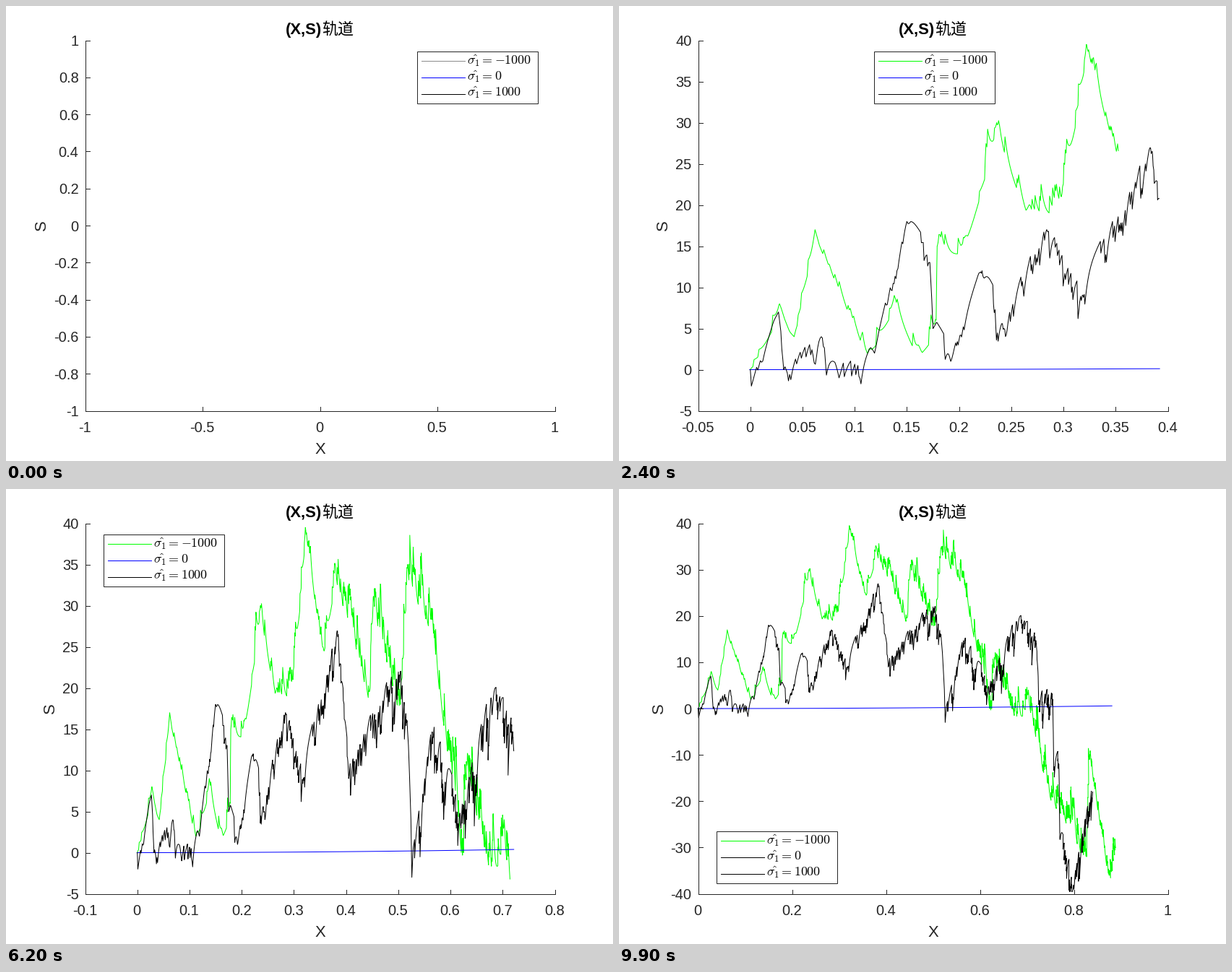
Animation, 840 px wide and 630 px high, one loop 10000 ms. Source, as a matplotlib script:

```python
import numpy as np
import matplotlib.pyplot as plt
from matplotlib.animation import FuncAnimation
from matplotlib.patches import Rectangle

plt.rcParams["mathtext.fontset"] = "cm"
W, H, DPI = 840, 630, 100
PX = 72 / DPI
LEFT, RIGHT, TOP, BOTTOM = 109.5, 759.5, 47.5, 560.5
INK = "#262626"
GREEN, BLUE, BLACK = "#00ff00", "#0000ff", "#000000"
FRAMES = 100

# Main turning points: X in thousandths, S
GREEN_KEYS = [
    (0, 0), (28, 8), (42, 4), (62, 17), (112, 2), (138, 9), (161, 3),
    (178, 6), (179, 15), (205, 16), (236, 30), (267, 20), (298, 21),
    (322, 39.5), (355, 25), (379, 35), (446, 20), (452, 31), (504, 18),
    (518, 35), (564, 29), (625, 0), (632, 11), (680, -1), (703, 4),
    (744, -16), (797, -24), (827, -32), (834, -10), (875, -36), (889, -30)]
BLACK_KEYS = [
    (0, 0), (1, -2), (27, 7), (32, 0), (68, 4), (85, -1), (119, 2),
    (150, 18), (172, 13), (175, 5), (192, 1), (222, 12), (243, 5),
    (284, 17), (318, 9), (385, 26.5), (405, 9), (504, 22), (517, 16),
    (526, -3), (567, 14), (620, 3), (679, 18), (720, 14), (725, 1),
    (755, 2), (757, -13), (768, -12), (770, -28), (800, -39), (840, -18)]


def smooth(t, a, b):
    u = np.clip((t - a) / (b - a), 0, 1)
    return u * u * (3 - 2 * u)


def lead(n):
    """X reached by the blue path at frame n."""
    u = n / FRAMES
    return u * (2.03 - 1.81 * u + .665 * u * u)


def jump_path(keys, sign, seed, pace):
    """Path through the keys with sudden jumps that drift back."""
    rng = np.random.default_rng(seed)
    kx, ks = np.array(keys).T / [[1000], [1]]
    steps = 1 + np.abs(np.diff(kx)) * 1000 * (.8 + 2 * kx[:-1])
    at = np.concatenate([[0], np.cumsum(steps)])
    u = np.union1d(np.arange(at[-1]), at)
    x, s = np.interp(u, at, kx), np.interp(u, at, ks)

    chance, decay = .22, .8
    kicks = np.where(rng.random(len(u)) < chance, rng.uniform(.8, 2.2, len(u)), 0)
    level = mean = chance * 1.5 / (1 - decay)
    saw = np.empty(len(u))
    for i, kick in enumerate(kicks):
        level = level * decay + kick
        saw[i] = level - mean
    taper = np.clip(np.abs(u[:, None] - at).min(axis=1) / 4, 0, 1)
    calm = np.where(sign * np.gradient(s, u) < -.25, .5, 1)
    saw *= sign * taper * calm * (.8 + 1.5 * x)

    s = np.clip(s + saw, -39.5, 39.8)
    x = x - sign * .0003 * x * saw
    n = np.arange(FRAMES)
    when = np.interp(np.maximum.accumulate(x), lead(n) * pace(n), n)
    return x, s, when


green = jump_path(GREEN_KEYS, 1, 4, lambda n: .9 + .11 * smooth(n, 35, 72))
black = jump_path(BLACK_KEYS, -1, 9, lambda n: 1 - .05 * smooth(n, 62, 87))


def shown(path, n):
    count = np.searchsorted(path[2], n + 1e-9, side="right")
    return path[0][:count], path[1][:count]


def auto_ticks(lo, hi):
    """Smallest 1-2-5 step that covers the range in at most nine intervals."""
    for e in range(-4, 3):
        for m in (1, 2, 5):
            step = m * 10.0 ** e
            a = int(np.floor(lo / step + .005))
            b = int(np.ceil(hi / step - .005))
            if 0 < b - a <= 9:
                return [round(i * step, 6) for i in range(a, b + 1)]


def scale(v, ticks, start, end):
    return start + (np.asarray(v) - ticks[0]) / (ticks[-1] - ticks[0]) * (end - start)


fig = plt.figure(figsize=(W / DPI, H / DPI), dpi=DPI, facecolor="white")
ax = fig.add_axes([0, 0, 1, 1])


def line(x, y, color, **kw):
    ax.plot(x, y, color=color, lw=PX, **kw)


def text(x, y, s, size=20, ha="center", color=INK, font="Liberation Sans", **kw):
    ax.text(x, y, s, fontsize=size * PX, ha=ha, va="baseline", color=color,
            fontfamily=font, **kw)


def label_width(s):
    return 20 * sum({"-": .333, ".": .278}.get(c, .556) for c in s)


def draw_axes(xt, yt):
    line([LEFT, LEFT], [TOP, BOTTOM], INK)
    line([LEFT, RIGHT], [BOTTOM, BOTTOM], INK)
    for v in xt:
        x = scale(v, xt, LEFT, RIGHT)
        line([x, x], [BOTTOM, BOTTOM - 6], INK)
        text(x - .5, 590, f"{v:g}")
    names = [f"{v:g}" for v in yt]
    for v, name in zip(yt, names):
        y = scale(v, yt, BOTTOM, TOP)
        line([LEFT, LEFT + 6], [y, y], INK)
        text(100.5, y + 7.5, name, ha="right")
    text(435, 620, "X", 22)
    text(89.5 - max(map(label_width, names)), 304, "S", 22,
         rotation=90, rotation_mode="anchor")
    text(387, 39, "(X,S)", 22, "left", "black", weight="bold")
    text(437.5, 39, "轨道", 22, "left", "black", "Noto Sans CJK JP")


def legend_spot(xt, yt):
    if yt[0] <= -40:
        return 134, 473
    if xt[-1] > .9:
        return 568, 62
    if yt[0] <= -20:
        return 352, 371
    if yt[-1] >= 25 and xt[-1] < .55:
        return 352, 62
    return 134, 62


def draw_legend(x, y, n):
    late = n >= 72
    colors = ("#8c8c8c" if n == 0 else GREEN, BLACK if late else BLUE, BLACK)
    ax.add_patch(Rectangle((x + .5, y + .5), 167, 72, facecolor="white",
                           edgecolor=INK, lw=PX, zorder=3))
    for i, (color, value) in enumerate(zip(colors, ("{-}1000", "0", "1000"))):
        row = y + 13.5 + 23 * i
        line([x + 6.5, x + 66.5], [row, row], color, zorder=4)
        text(x + 70.5, y + 18.5 + 22.4 * i, rf"$\hat{{\sigma_1}}={value}$", 18,
             "left", "black", zorder=4)


def draw(n):
    ax.clear()
    ax.set(xlim=(0, W), ylim=(H, 0))
    ax.axis("off")
    if n == 0:
        xt = [-1, -.5, 0, .5, 1]
        yt = [i / 5 for i in range(-5, 6)]
    else:
        bx = np.linspace(-.0007, lead(n), 60)
        paths = [(*shown(green, n), GREEN), (bx, .75 * bx ** 2, BLUE),
                 (*shown(black, n), BLACK)]
        xt = auto_ticks(-.0007, max(p[0].max() for p in paths))
        yt = auto_ticks(min(p[1].min() for p in paths),
                        max(p[1].max() for p in paths))
        for x, s, color in paths:
            line(scale(x, xt, LEFT, RIGHT), scale(s, yt, BOTTOM, TOP), color)
    draw_axes(xt, yt)
    draw_legend(*legend_spot(xt, yt), n)
    return []


anim = FuncAnimation(fig, draw, frames=FRAMES, interval=100, repeat=True,
                     repeat_delay=0, init_func=lambda: [])
plt.show()
```
